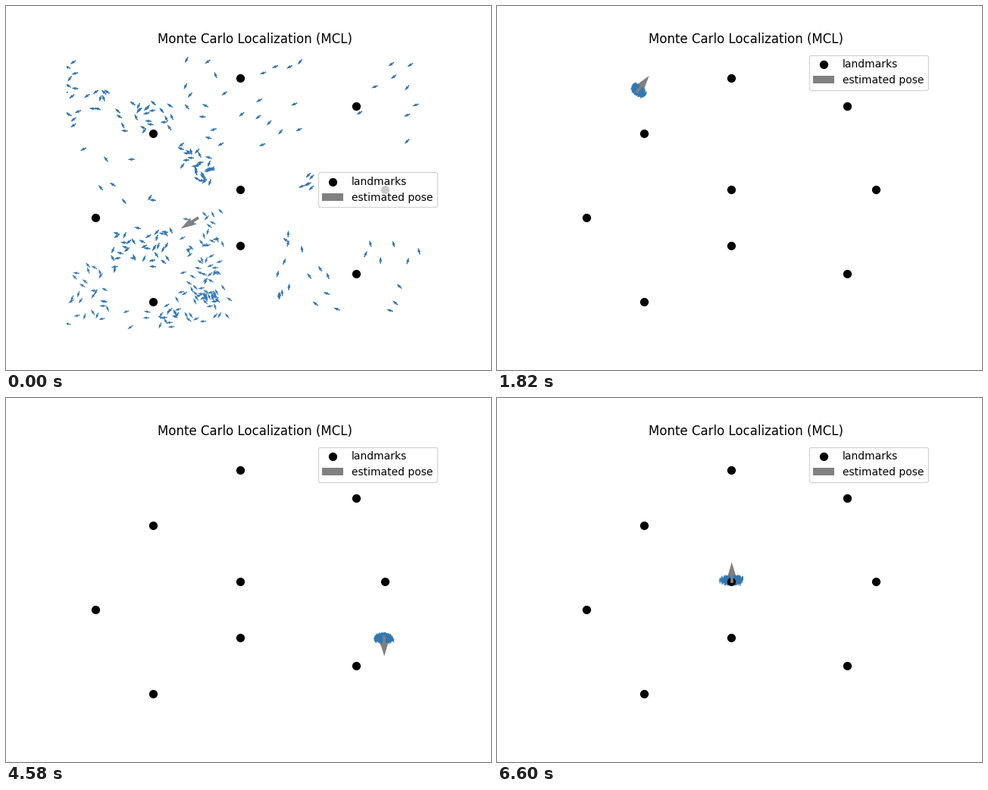
A matplotlib script for the animation above (6.62 s loop, 640x480 px).

```python
import numpy as np
import matplotlib.pyplot as plt
from matplotlib.animation import FuncAnimation

FRAMES, STEP_MS = 331, 20
COUNT = 500
SPEED = 3.8  # pixels per step
LEFT, RIGHT, TOP, BOTTOM = 80, 576, 57.6, 427.2

# Landmarks on a 13 x 10 map
LANDMARKS = np.array([(1, 4), (3, 1), (3, 7), (6, 9), (6, 5), (6, 3),
                      (10, 8), (11, 5), (10, 2)], float)

# Robot route: step, x, y in pixels
ROUTE = np.array([
    (0, 230, 381), (14, 177, 379), (22, 154, 362), (38, 151, 306),
    (68, 158, 193), (91, 184, 114), (102, 213, 86), (118, 271, 71),
    (136, 340, 69), (170, 457, 101), (176, 470, 119), (204, 495, 220),
    (229, 499, 313), (245, 498, 371), (250, 487, 382), (272, 401, 380),
    (290, 333, 379), (296, 316, 368), (306, 311, 333), (330, 310, 244)], float)

# First guesses: x, y, half width, half height, count
CLUSTERS = [
    (90, 112, 9, 44, 13),
    (126, 125, 16, 14, 8),
    (184, 146, 38, 22, 24),
    (246, 194, 12, 18, 10),
    (264, 214, 12, 18, 20),
    (320, 125, 85, 60, 24),
    (505, 125, 45, 55, 9),
    (400, 230, 8, 12, 6),
    (150, 225, 65, 40, 8),
    (455, 355, 112, 60, 25),
    (180, 318, 40, 26, 38),
    (262, 325, 28, 56, 48),
    (268, 384, 16, 9, 24),
    (252, 406, 50, 18, 22),
    (112, 370, 24, 26, 20),
    (160, 413, 75, 12, 18),
]
FIRST_POSE, FIRST_HEADING = np.array([254, 279]), np.radians(212)


def follow(route):
    """Smooth positions and screen headings for every step."""
    t, pts = route[:, 0], route[:, 1:]
    slope = np.gradient(pts, t, axis=0)
    n = np.arange(FRAMES)
    i = np.clip(np.searchsorted(t, n, side="right") - 1, 0, len(t) - 2)
    h = (t[i + 1] - t[i])[:, None]
    u = (n - t[i])[:, None] / h
    p, q = pts[i], pts[i + 1]
    a, b = h * slope[i], h * slope[i + 1]
    c, d = 3 * (q - p) - 2 * a - b, 2 * (p - q) + a + b
    pos = p + u * a + u**2 * c + u**3 * d
    vel = a + 2 * u * c + 3 * u**2 * d
    return pos, np.arctan2(-vel[:, 1], vel[:, 0])


def unit(angle):
    return np.stack([np.cos(angle), np.sin(angle)], axis=-1)


def ahead(angle):
    """Direction in pixel axes, where y grows downwards."""
    return unit(angle) * (1, -1)


def scatter_guesses():
    rng = np.random.default_rng(7)
    pos = np.concatenate([
        np.array([x, y]) + rng.uniform(-1, 1, (k, 2)) * (w, h)
        for x, y, w, h, k in CLUSTERS])
    x, y = pos.T
    mean = np.where(x < 290, 180, np.where(y < 270, 215, 115))
    spread = np.where(x < 290, 75, np.where(y < 270, 18, 55))
    ang = np.radians(mean + spread * rng.uniform(-1, 1, len(pos)))
    life = 1 + rng.exponential(2, len(pos))
    pick = np.arange(COUNT) % len(pos)
    return pos[pick], ang[pick], life[pick]


PATH, HEADING = follow(ROUTE)
GUESS, GUESS_ANG, LIFE = scatter_guesses()


def particles(n):
    rng = np.random.default_rng(1000 + n)
    head = HEADING[n]
    side = 3.7 + 1.2 * max(0, n - 310) / 20
    along = rng.normal(0, 1.5, (COUNT, 1)) * ahead(head)
    across = rng.normal(0, side, (COUNT, 1)) * ahead(head + np.pi / 2)
    pos = PATH[n] + along + across
    ang = head + rng.normal(0, 0.12, COUNT)

    alive = n < LIFE
    jitter = rng.normal(0, 1, (COUNT, 2)) * min(n, 3)
    drift = GUESS + n * SPEED * ahead(GUESS_ANG) + jitter
    pos = np.where(alive[:, None], drift, pos)
    ang = np.where(alive, GUESS_ANG, ang)
    return pos, ang, alive.mean()


def legend_place(n):
    if n < 3:
        return "center right"
    return "upper left" if 152 <= n <= 174 else "upper right"


fig, ax = plt.subplots(figsize=(6.4, 4.8), dpi=100)
ax.set_xlim(LEFT, RIGHT)
ax.set_ylim(BOTTOM, TOP)
ax.axis("off")
ax.set_title("Monte Carlo Localization (MCL)")

cloud = ax.quiver(*GUESS.T, *unit(GUESS_ANG).T, color="#3277b2",
                  width=0.0024, scale=57)
marks = LANDMARKS * ((RIGHT - LEFT) / 13, (TOP - BOTTOM) / 10) + (LEFT, BOTTOM)
ax.scatter(*marks.T, s=50, c="black", label="landmarks")
pose = ax.quiver([FIRST_POSE[0]], [FIRST_POSE[1]], [1], [0], color="gray",
                 width=0.0075, scale=18, label="estimated pose")
legend = ax.legend(loc="upper right")


def update(n):
    pos, ang, unsure = particles(n)
    cloud.set_offsets(pos)
    cloud.set_UVC(*unit(ang).T)

    spot = (1 - unsure) * PATH[n] + unsure * FIRST_POSE
    u, v = (1 - unsure) * unit(HEADING[n]) + unsure * unit(FIRST_HEADING)
    size = np.hypot(u, v)
    pose.set_offsets([spot])
    pose.set_UVC([u / size], [v / size])

    legend.set_loc(legend_place(n))
    return cloud, pose, legend


anim = FuncAnimation(fig, update, frames=FRAMES, interval=STEP_MS,
                     repeat=True, repeat_delay=0, blit=False)
plt.show()
```
